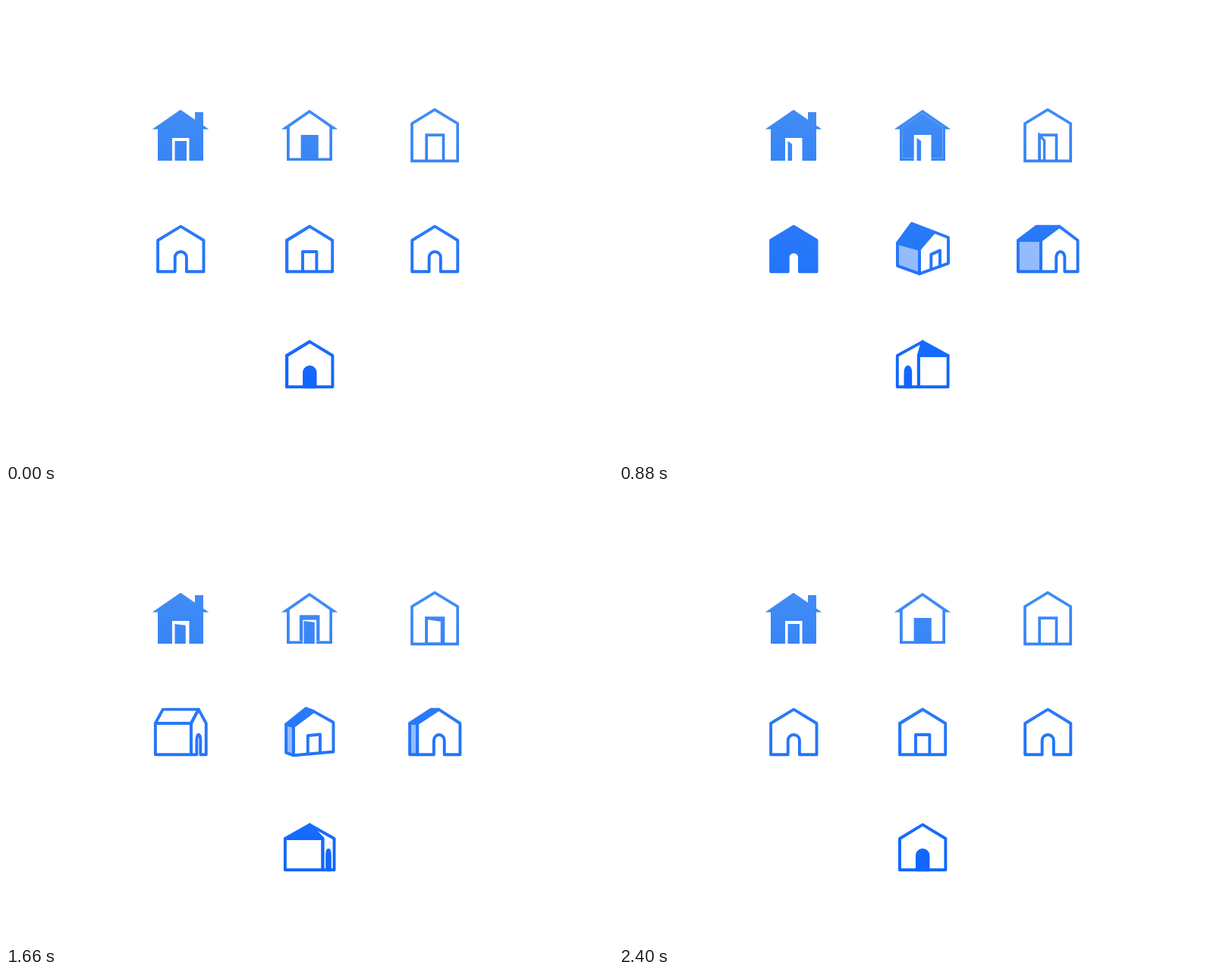
Animation of 800x600 px, one loop 2420 ms. Source, as an HTML page with a canvas:

```html
<!DOCTYPE html>
<html lang="en">
<head>
<meta charset="utf-8">
<title>Seven houses</title>
<style>
html, body { margin: 0; width: 100%; height: 100%; overflow: hidden; background: #fff; }
canvas { display: block; }
</style>
</head>
<body>
<canvas id="stage" width="800" height="600"></canvas>
<script>
const ctx = document.getElementById('stage').getContext('2d');
const LOOP = 2420;

const blue = ctx.createLinearGradient(0, 135, 0, 505);
blue.addColorStop(0, 'rgb(66,141,245)');
blue.addColorStop(0.45, 'rgb(40,121,249)');
blue.addColorStop(1, 'rgb(15,101,255)');

const clamp = x => Math.min(1, Math.max(0, x));
const mix = (a, b, k) => a + (b - a) * k;
const mixPt = (a, b, k) => [mix(a[0], b[0], k), mix(a[1], b[1], k)];
const easeInOut = p => p < 0.5 ? 4 * p ** 3 : 1 - 4 * (1 - p) ** 3;
const ramp = (t, start, length) => easeInOut(clamp((t - start) / length));

// Opens over the given time, holds, then closes.
const openness = (t, length) => ramp(t, 20, length) - ramp(t, 1380, 500);

function poly(points, closed = true) {
  const path = new Path2D();
  points.forEach(([x, y], i) => i ? path.lineTo(x, y) : path.moveTo(x, y));
  if (closed) path.closePath();
  return path;
}

function fill(path, color = blue) {
  ctx.fillStyle = color;
  ctx.fill(path);
}

function stroke(path, width = 3.9) {
  ctx.lineWidth = width;
  ctx.strokeStyle = blue;
  ctx.stroke(path);
}

function solid(path) {
  fill(path);
  stroke(path);
}

function tint(path) {
  ctx.globalAlpha = 0.49;
  fill(path);
  ctx.globalAlpha = 1;
}

function box(x0, y0, x1, y1, color) {
  fill(poly([[x0, y0], [x1, y0], [x1, y1], [x0, y1]]), color);
}

// Door leaf hinged on its left edge.
function leaf(x, top, bottom, width, angle, drop) {
  const right = x + width * Math.cos(angle);
  return poly([[x, top], [right, top + drop * Math.sin(angle)], [right, bottom], [x, bottom]]);
}

function roofedShape(cx) {
  return [[cx - 37.3, 162.5], [cx, 136.8], [cx + 37.3, 162.5],
          [cx + 30, 162.5], [cx + 30, 204], [cx - 30, 204], [cx - 30, 162.5]];
}

function solidHouse(k) {
  fill(poly(roofedShape(230)));
  box(249, 140, 260, 165);
  box(219, 174, 241.5, 204, '#fff');
  fill(leaf(222.5, 178, 204, 15.5, k * 1.2, 4.3));
}

function fillingHouse(k) {
  fill(poly(roofedShape(400)));
  const room = poly([[373.8, 159.5], [400, 141.3], [426.3, 159.5], [426.3, 200.4], [373.8, 200.4]]);
  fill(room, '#fff');
  const grow = 20 * k ** 2.15;
  ctx.save();
  ctx.clip(room);
  box(388.8 - grow, 170 - 2 * grow, 411.5 + grow, 204);
  ctx.restore();
  if (k > 0.001) {
    box(mix(392.5, 388.8, k), mix(174, 170, k), mix(408, 411.5, k), 204, '#fff');
    fill(leaf(392.5, 174, 204, 15.5, k * 1.2, 4.3));
  } else {
    box(388.8, 170, 411.5, 204);
  }
}

function lineHouse(k) {
  ctx.lineJoin = 'miter';
  stroke(poly([[535, 155], [565, 136.6], [595.2, 155], [595.2, 204.3], [535, 204.3]]), 3.7);
  stroke(poly([[554.2, 204.3], [554.2, 170.2], [576.5, 170.2], [576.5, 204.3]], false), 3.7);
  if (k > 0.001) stroke(leaf(554.2, 170.2, 204.3, 22.3, k * 1.28, 7.5), 3.4);
  ctx.lineJoin = 'round';
}

// Gable wall between x0 and x1 with an arched door cut out of the base.
function gable(x0, x1, doorHalf, shift = 0) {
  const cx = (x0 + x1) / 2, dx = cx + shift;
  const r = Math.max(doorHalf, 0.01);
  const path = poly([[dx - r, 350.2], [x0, 350.2], [x0, 309], [cx, 290.6],
                     [x1, 309], [x1, 350.2], [dx + r, 350.2]], false);
  path.lineTo(dx + r, 331.6);
  path.ellipse(dx, 331.6, r, 7.6, 0, 0, Math.PI, true);
  path.closePath();
  return path;
}

// Roof slope and wall of the long side, running back from a gable.
function sideParts(wall0, wall1, ridge0, ridge1) {
  return {
    roof: poly([[wall0, 309], [ridge0, 290.6], [ridge1, 290.6], [wall1, 309]]),
    wall: poly([[wall0, 309], [wall1, 309], [wall1, 350.2], [wall0, 350.2]])
  };
}

function turningHouse(k) {
  const W = 60.4, D = 70, v = k * 2;
  const back = v > 1;
  const front = W * Math.abs(1 - v);
  const side = D * (1 - Math.abs(1 - v));
  const left = 230.3 - (front + side) / 2, right = left + front + side;
  const door = 7.6 * front / W;
  const half = front / 2;
  if (side > 0.01) {
    const s = back
      ? sideParts(left + front, right, left + half, right - half)
      : sideParts(left, left + side, left + half, right - half);
    stroke(s.roof);
    stroke(s.wall);
  }
  if (back) solid(gable(left, left + front, door));
  else stroke(gable(left + side, right, door));
}

function tiltingHouse(k) {
  const at = (x0, y0, x1, y1) => mixPt([x0, y0], [x1, y1], k);
  const sideTop = at(370.2, 309, 367, 312.5), sideBase = at(370.2, 350.2, 367, 342.6);
  const midTop = at(370.2, 309, 396, 320.5), midBase = at(370.2, 350.2, 396, 353.2);
  const endTop = at(430.2, 309, 434, 305.3), endBase = at(430.2, 350.2, 434, 339.3);
  const ridge = at(400.2, 290.6, 385.8, 286.8), apex = at(400.2, 290.6, 415.3, 298);
  const wall = poly([sideTop, midTop, midBase, sideBase]);
  tint(wall);
  stroke(wall);
  solid(poly([sideTop, ridge, apex, midTop]));
  stroke(poly([midTop, apex, endTop, endBase, midBase]));
  stroke(poly([at(391, 350.2, 411.3, 347.6), at(391, 324, 411.3, 327.6),
               at(409.4, 324, 423, 322.4), at(409.4, 350.2, 423, 343.3)], false));
}

function extendingHouse(k) {
  const left = mix(535.2, 526, k), mid = mix(535.2, 556, k), right = mix(595.3, 604.6, k);
  const half = (right - mid) / 2;
  if (k > 0.001) {
    const s = sideParts(left, mid, left + half, mid + half);
    tint(s.wall);
    stroke(s.wall);
    solid(s.roof);
  }
  stroke(gable(mid, right, mix(7.6, 5.6, k), 1.5 * k));
}

// Half turn with a fixed roof tip; long walls lead the gable walls slightly.
function spinningHouse(turn) {
  const sin = Math.sin(turn), cos = Math.cos(turn);
  const a = Math.abs(cos), b = 1.25 * sin;
  const total = 60.4 + 6.4 * Math.abs(Math.sin(2 * turn));
  const left = 400.2 - total / 2, right = left + total;
  const front = total * a / (a + b);
  const onRight = cos >= 0;
  const edge = onRight ? right - front : left + front;
  const tip = [400.2, 442.6], eave = 461, base = 502.2;

  const [s0, s1] = onRight ? [left, edge] : [edge, right];
  if (s1 - s0 > 0.05) {
    solid(poly([[s0, eave], tip, [s1, eave]]));
    stroke(poly([[s0, eave], [s1, eave], [s1, base], [s0, base]]));
  }
  const [f0, f1] = onRight ? [edge, right] : [left, edge];
  stroke(poly([[f0, eave], tip, [f1, eave], [f1, base], [f0, base]]));

  const r = 7.3 * front / 60.4, cx = (f0 + f1) / 2;
  const door = poly([[cx - r, base], [cx + r, base]], false);
  door.lineTo(cx + r, 483.3);
  door.ellipse(cx, 483.3, r, 7.3, 0, 0, Math.PI, true);
  door.closePath();
  solid(door);
}

function draw(t) {
  ctx.fillStyle = '#fff';
  ctx.fillRect(0, 0, 800, 600);
  ctx.lineJoin = 'round';
  const k = clamp(openness(t, 600));
  solidHouse(k);
  fillingHouse(k);
  lineHouse(k);
  turningHouse(clamp(openness(t, 800)));
  tiltingHouse(k);
  extendingHouse(k);
  const spin = t >= 2400 ? 0 : (t % 1200) / 1200;
  spinningHouse(spin * Math.PI);
}

const begin = performance.now();
function tick() {
  draw((performance.now() - begin) % LOOP);
  requestAnimationFrame(tick);
}
tick();
</script>
</body>
</html>
```
